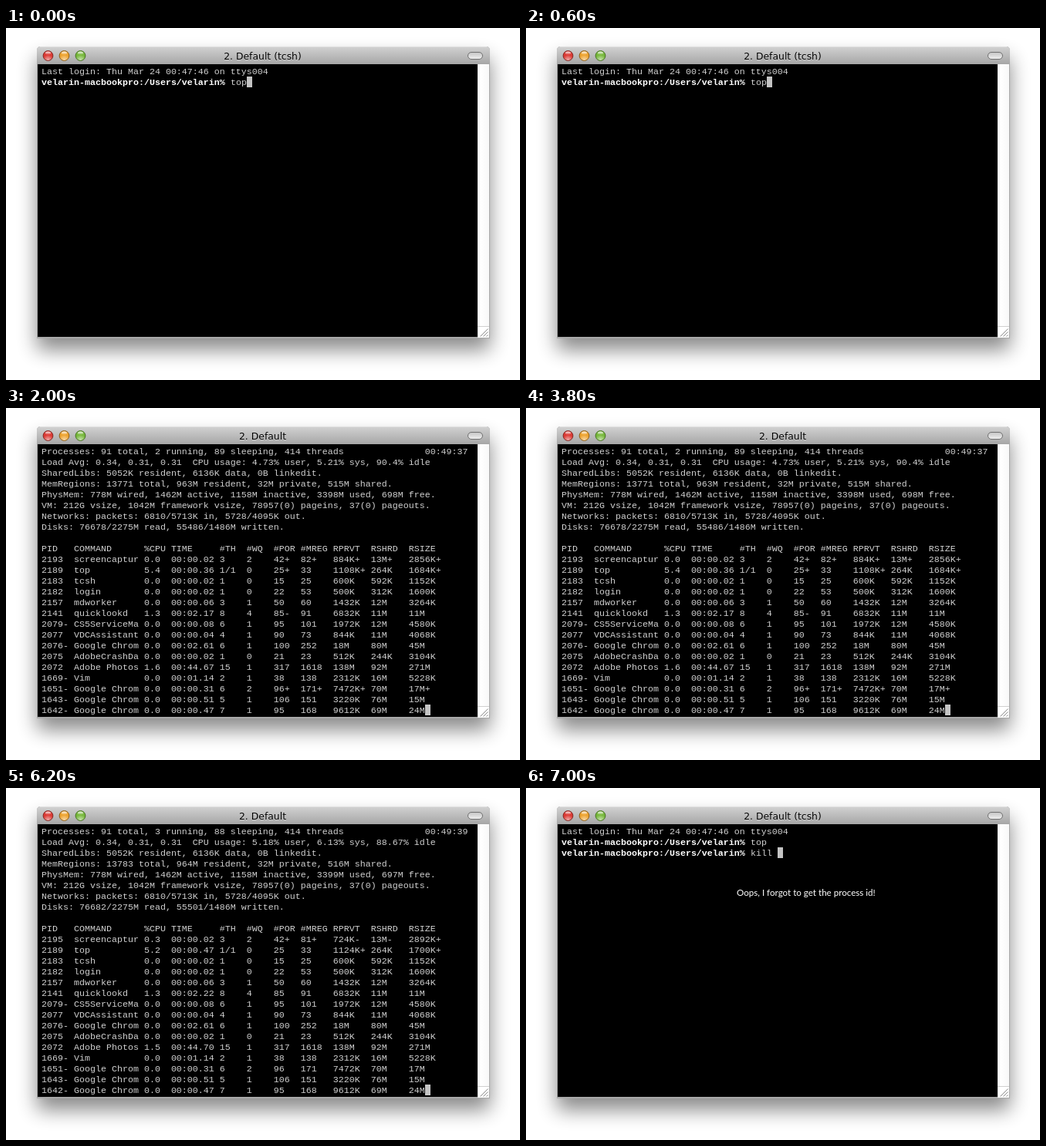
An HTML page that plays this animation: 666x457 px, repeating every 8 s.

```html
<!DOCTYPE html>
<html lang="en">
<head>
<meta charset="utf-8">
<title>Terminal</title>
<style>
  html, body { margin: 0; width: 100%; height: 100%; overflow: hidden; background: #fff; }
  svg { display: block; width: 666px; height: 457px; }
  #title text { font: 12.4px "DejaVu Sans", sans-serif; text-anchor: middle; }
  #screen text { font: 11.666px "Liberation Mono", monospace; fill: #d0d0d0; white-space: pre; }
  #screen .bold { font-weight: bold; fill: #fff; }
  #note { font: 11.6px Lato, sans-serif; fill: #fff; }
</style>
</head>
<body>
<svg viewBox="0 0 666 457">
  <defs>
    <linearGradient id="bar" x2="0" y2="1">
      <stop stop-color="#d2d2d2"/><stop offset="1" stop-color="#a6a6a6"/>
    </linearGradient>
    <linearGradient id="track" x2="1" y2="0">
      <stop stop-color="#eee"/><stop offset=".25" stop-color="#fff"/><stop offset="1" stop-color="#f8f8f8"/>
    </linearGradient>
    <linearGradient id="pill" x2="0" y2="1">
      <stop stop-color="#c4c4c4"/><stop offset="1" stop-color="#f0f0f0"/>
    </linearGradient>
    <linearGradient id="shine" x2="0" y2="1">
      <stop stop-color="#fff" stop-opacity=".9"/><stop offset="1" stop-color="#fff" stop-opacity=".1"/>
    </linearGradient>
    <radialGradient id="glow" cy=".95" r=".55">
      <stop stop-color="#fff" stop-opacity=".6"/><stop offset="1" stop-color="#fff" stop-opacity="0"/>
    </radialGradient>
    <filter id="blur" x="-20%" y="-20%" width="140%" height="140%"><feGaussianBlur stdDeviation="13"/></filter>
  </defs>

  <rect x="40" y="39" width="587" height="379" rx="4" opacity=".46" filter="url(#blur)"/>
  <path d="M40 403V29q0-5 5-5H622q5 0 5 5V403z" fill="#a9a9a9"/>
  <path d="M40 47V29q0-5 5-5H622q5 0 5 5V47z" fill="url(#bar)"/>
  <path d="M44 24.5H623" stroke="#e0e0e0"/>
  <rect x="41" y="47" width="570" height="354" fill="#000"/>
  <rect x="611" y="47" width="15" height="355" fill="url(#track)"/>
  <rect x="612" y="388" width="14" height="14" fill="#fff"/>
  <path d="M611 387.5H626" stroke="#d0d0d0"/>
  <path d="M614.5 400.5l10-10M618.5 400.5l6-6M622.5 400.5l2-2" stroke="#8c8c8c"/>
  <g id="lights"></g>
  <rect x="598.5" y="31.5" width="19" height="9" rx="4.5" fill="url(#pill)" stroke="#707070"/>
  <g id="title">
    <text x="332.5" y="42" fill="#fff" opacity=".4"></text>
    <text x="332.5" y="41" fill="#000"></text>
  </g>
  <g id="screen"></g>
  <text id="note" x="273" y="140">Oops, I forgot to get the process id!</text>
</svg>

<script>
const NS = 'http://www.w3.org/2000/svg';
const $ = id => document.getElementById(id);
const CELL = 7, LINE = 14, LEFT = 46, BASE = 60, LOOP = 8000;

function add(parent, tag, attrs) {
  const el = parent.appendChild(document.createElementNS(NS, tag));
  for (const key in attrs) el.setAttribute(key, attrs[key]);
  return el;
}

[['#dc3a34', '#7d2723'], ['#eda32f', '#8a5c17'], ['#78b83c', '#43701f']].forEach(([fill, edge], i) => {
  const cx = 54.5 + 21 * i, cy = 36;
  add($('lights'), 'circle', { cx, cy, r: 6.4, fill, stroke: edge });
  add($('lights'), 'circle', { cx, cy, r: 6, fill: 'url(#glow)' });
  add($('lights'), 'ellipse', { cx, cy: cy - 3.4, rx: 3.6, ry: 2, fill: 'url(#shine)' });
});

// Cells split by "|" are padded to the column widths of top.
const WIDTHS = [6, 13, 5, 9, 5, 5, 5, 6, 7, 7, 6];
const format = line => line.includes('|')
  ? line.split('|').map((cell, i) => cell.padEnd(WIDTHS[i])).join('')
  : line;
const clock = (line, time) => line.padEnd(71) + time;

const first = [
  clock('Processes: 91 total, 3 running, 88 sleeping, 417 threads', '00:49:34'),
  'Load Avg: 0.37, 0.32, 0.32  CPU usage: 4.24% user, 5.18% sys, 90.56% idle',
  'SharedLibs: 5052K resident, 6136K data, 0B linkedit.',
  'MemRegions: 13758 total, 970M resident, 32M private, 494M shared.',
  'PhysMem: 778M wired, 1462M active, 1158M inactive, 3398M used, 699M free.',
  'VM: 212G vsize, 1042M framework vsize, 78957(0) pageins, 37(0) pageouts.',
  'Networks: packets: 6809/5713K in, 5728/4095K out.',
  'Disks: 76678/2275M read, 55479/1486M written.',
  '',
  'PID|COMMAND|%CPU|TIME|#TH|#WQ|#POR|#MREG|RPRVT|RSHRD|RSIZE',
  '2191|screencaptur|0.0|00:00.02|3|2|42+|83+|592K+|13M+|2860K+',
  '2189|top|5.4|00:00.19|1/1|0|25+|33|1088K+|264K|1664K+',
  '2183|tcsh|0.0|00:00.02|1|0|15|25|600K|592K|1152K',
  '2182|login|0.0|00:00.02|1|0|22|53|500K|312K|1600K',
  '2157|mdworker|0.0|00:00.06|3|1|50|60|1432K|12M|3264K',
  '2141|quicklookd|0.0|00:02.13|8|4|85|91|6804K|11M|11M',
  '2079-|CS5ServiceMa|0.0|00:00.08|6|1|95|101|1972K|12M|4580K',
  '2077|VDCAssistant|0.0|00:00.04|4|1|90|73|844K|11M|4068K',
  '2076-|Google Chrom|0.0|00:02.61|6|1|100|252|18M+|80M-|45M',
  '2075|AdobeCrashDa|0.0|00:00.02|1|0|21|23|512K|244K|3104K',
  '2072|Adobe Photos|1.5|00:44.62|15|1|317|1618|135M-|95M+|271M',
  '1669-|Vim|0.0|00:01.14|3|2|40|140|2320K|16M|5236K',
  '1651-|Google Chrom|0.0|00:00.31|5|1|94|169|7464K+|70M-|17M',
  '1643-|Google Chrom|0.0|00:00.51|5|1|106|151|3180K-|76M+|15M',
  '1642-|Google Chrom|0.0|00:00.47|7|1|95|168|9612K+|69M-|24M'
];

const second = Object.assign([...first], {
  0: clock('Processes: 91 total, 2 running, 89 sleeping, 414 threads', '00:49:37'),
  1: 'Load Avg: 0.34, 0.31, 0.31  CPU usage: 4.73% user, 5.21% sys, 90.4% idle',
  3: 'MemRegions: 13771 total, 963M resident, 32M private, 515M shared.',
  4: 'PhysMem: 778M wired, 1462M active, 1158M inactive, 3398M used, 698M free.',
  6: 'Networks: packets: 6810/5713K in, 5728/4095K out.',
  7: 'Disks: 76678/2275M read, 55486/1486M written.',
  10: '2193|screencaptur|0.0|00:00.02|3|2|42+|82+|884K+|13M+|2856K+',
  11: '2189|top|5.4|00:00.36|1/1|0|25+|33|1108K+|264K|1684K+',
  15: '2141|quicklookd|1.3|00:02.17|8|4|85-|91|6832K|11M|11M',
  18: '2076-|Google Chrom|0.0|00:02.61|6|1|100|252|18M|80M|45M',
  20: '2072|Adobe Photos|1.6|00:44.67|15|1|317|1618|138M|92M|271M',
  21: '1669-|Vim|0.0|00:01.14|2|1|38|138|2312K|16M|5228K',
  22: '1651-|Google Chrom|0.0|00:00.31|6|2|96+|171+|7472K+|70M|17M+',
  23: '1643-|Google Chrom|0.0|00:00.51|5|1|106|151|3220K|76M|15M',
  24: '1642-|Google Chrom|0.0|00:00.47|7|1|95|168|9612K|69M|24M'
});

const third = Object.assign([...second], {
  0: clock('Processes: 91 total, 3 running, 88 sleeping, 414 threads', '00:49:39'),
  1: 'Load Avg: 0.34, 0.31, 0.31  CPU usage: 5.18% user, 6.13% sys, 88.67% idle',
  3: 'MemRegions: 13783 total, 964M resident, 32M private, 516M shared.',
  4: 'PhysMem: 778M wired, 1462M active, 1158M inactive, 3399M used, 697M free.',
  7: 'Disks: 76682/2275M read, 55501/1486M written.',
  10: '2195|screencaptur|0.3|00:00.02|3|2|42+|81+|724K-|13M-|2892K+',
  11: '2189|top|5.2|00:00.47|1/1|0|25|33|1124K+|264K|1700K+',
  15: '2141|quicklookd|1.3|00:02.22|8|4|85|91|6832K|11M|11M',
  20: '2072|Adobe Photos|1.5|00:44.70|15|1|317|1618|138M|92M|271M',
  22: '1651-|Google Chrom|0.0|00:00.31|6|2|96|171|7472K|70M|17M'
});

const login = 'Last login: Thu Mar 24 00:47:46 on ttys004';
const prompt = 'velarin-macbookpro:/Users/velarin% ';
const shell = commands => [login, ...commands.map(c => prompt + c)];
const shellTitle = '2. Default (tcsh)', topTitle = '2. Default';

const scenes = [
  { at: 0, title: shellTitle, lines: shell(['top']), cursor: [38, 1] },
  { at: 1000, title: topTitle, lines: first, cursor: [71, 24] },
  { at: 2000, title: topTitle, lines: second, cursor: [71, 24] },
  { at: 5000, title: topTitle, lines: third, cursor: [71, 24] },
  { at: 7000, title: shellTitle, lines: shell(['top', 'kill ']), cursor: [40, 2], note: true }
];

function write(text, col, row, cls = '') {
  add($('screen'), 'text', { x: LEFT + col * CELL, y: BASE + row * LINE, class: cls }).textContent = text;
}

function draw({ title, lines, cursor: [col, row], note }) {
  for (const el of $('title').children) el.textContent = title;
  $('screen').replaceChildren();
  lines.forEach((line, i) => {
    if (line.startsWith(prompt)) {
      write(prompt, 0, i, 'bold');
      write(line.slice(prompt.length), prompt.length, i);
    } else {
      write(format(line), 0, i);
    }
  });
  add($('screen'), 'rect', {
    x: LEFT + col * CELL, y: BASE - 11 + row * LINE, width: CELL, height: LINE, fill: '#c4c4c4'
  });
  $('note').style.display = note ? '' : 'none';
}

const start = performance.now();
let shown;
function tick() {
  const t = (performance.now() - start) % LOOP;
  const scene = scenes.findLast(s => t >= s.at);
  if (scene !== shown) draw(shown = scene);
  requestAnimationFrame(tick);
}
tick();
</script>
</body>
</html>
```
